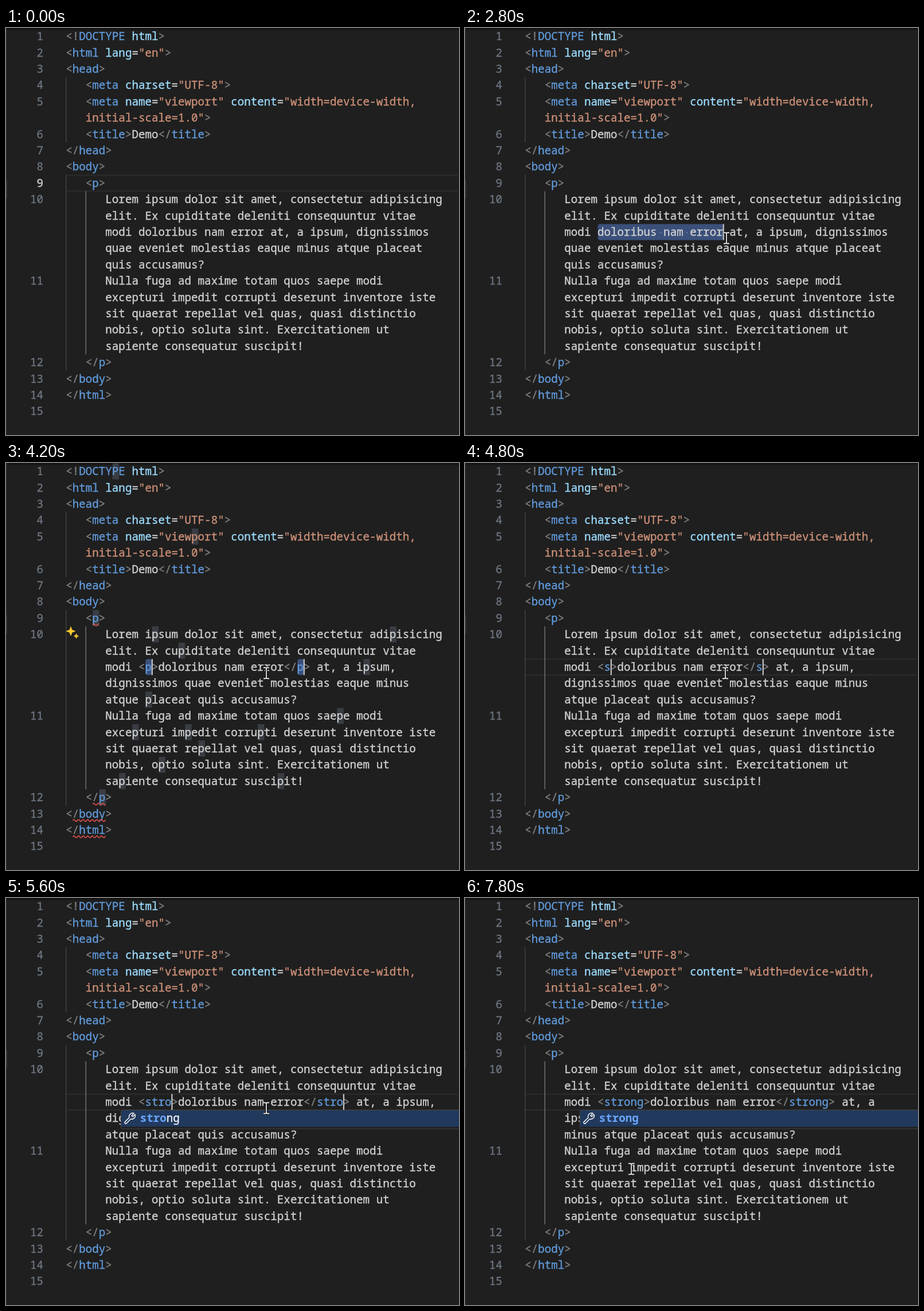
Animation, 790 px wide and 709 px high, one loop 8 s. Source, as an HTML page with a canvas:

```html
<!DOCTYPE html>
<html lang="en">
<head>
<meta charset="UTF-8">
<title>Wrap selection with tag</title>
<style>
html, body { margin: 0; width: 100%; height: 100%; overflow: hidden; background: #1f1f1f; }
canvas { display: block; }
</style>
</head>
<body>
<canvas id="stage" width="790" height="709"></canvas>
<script>
const ctx = document.getElementById('stage').getContext('2d');
const LOOP = 8000, STEP = 200;
const CHAR = 11.52, ROW = 28.4, LEFT = 105, WRAP = 51;
const FONT = '19.2px "Noto Sans Mono", "DejaVu Sans Mono", monospace';
const C = {
  bg: '#1f1f1f', text: '#d2d2d2', punct: '#808080', tag: '#619bdc', string: '#ce9178',
  attr: '#9cdcfe', number: '#6e7681', guide: '#404040', activeGuide: '#707070',
  lineBorder: '#2a2a2a', selection: '#3b507a', word: '#393d43', error: '#e5504c',
  caret: '#c4c4c4', match: '#6aa5fa', panel: '#202020', panelBorder: '#454545', active: '#21395d'
};

const HEAD = [
  [1, 0, '<!DOCTYPE html>'],
  [2, 0, '<html lang="en">'],
  [3, 0, '<head>'],
  [4, 3, '<meta charset="UTF-8">'],
  [5, 3, '<meta name="viewport" content="width=device-width,'],
  ['', 3, 'initial-scale=1.0">'],
  [6, 3, '<title>Demo</title>'],
  [7, 0, '</head>'],
  [8, 0, '<body>'],
  [9, 3, '<p>']
];
const TAIL = [[12, 3, '</p>'], [13, 0, '</body>'], [14, 0, '</html>'], [15, 0, '']];
const WRAPPED = 'doloribus nam error';
const first = inner => 'Lorem ipsum dolor sit amet, consectetur adipisicing elit. Ex cupiditate ' +
  `deleniti consequuntur vitae modi ${inner} at, a ipsum, dignissimos quae eveniet molestias ` +
  'eaque minus atque placeat quis accusamus?';
const SECOND = 'Nulla fuga ad maxime totam quos saepe modi excepturi impedit corrupti deserunt ' +
  'inventore iste sit quaerat repellat vel quas, quasi distinctio nobis, optio soluta sint. ' +
  'Exercitationem ut sapiente consequatur suscipit!';

// [time, tag name]
const EDITS = [[0, ''], [4000, 'p'], [4800, 's'], [5000, 'st'], [5400, 'str'],
  [5600, 'stro'], [5800, 'stron'], [6000, 'strong']];
// [time, x, y]
const MOUSE = [[400, 540, 620], [800, 330, 430], [1000, 245, 362], [1200, 231, 354],
  [1600, 231, 354], [2400, 456, 366], [3600, 456, 366], [4000, 454, 366], [6400, 454, 366],
  [6600, 451, 387], [7400, 292, 473], [7600, 290, 472], [8000, 290, 472]];
const DRAG_START = 1600, DRAG_END = 2400;

const colX = col => LEFT + col * CHAR;
const midY = row => 14.6 + row * ROW;

function wrap(number, text) {
  const lines = [''];
  for (const word of text.split(' ')) {
    const last = lines.length - 1;
    const joined = lines[last] ? lines[last] + ' ' + word : word;
    if (joined.length > WRAP) lines.push(word); else lines[last] = joined;
  }
  return lines.map((line, i) => [i ? '' : number, 6, line]);
}

function rect(color, x, y, w, h, radius = 0) {
  ctx.fillStyle = color;
  ctx.beginPath();
  ctx.roundRect(x, y, w, h, radius);
  ctx.fill();
}

// A hairline stroke gives the glyphs a slightly heavier weight.
function chars(text, x, row, colorAt, boldAt = () => false) {
  ctx.lineWidth = 0.35;
  [...text].forEach((ch, i) => {
    ctx.font = (boldAt(i) ? 'bold ' : '') + FONT;
    ctx.fillStyle = ctx.strokeStyle = colorAt(i);
    const at = [x - 0.8 + i * CHAR, midY(row) + 6.5];
    ctx.fillText(ch, ...at);
    if (!boldAt(i)) ctx.strokeText(ch, ...at);
  });
}

const SYNTAX = /(<[!\/]?|>)|((?<=<[!\/]?)\w+)|("[^"]*"?|initial-[^"]*")|((?<=DOCTYPE )html|\w+(?=="))/g;
function code(text, x, row) {
  const colors = Array(text.length).fill(C.text);
  const kinds = [C.punct, C.tag, C.string, C.attr];
  for (const m of text.matchAll(SYNTAX)) {
    colors.fill(kinds[m.slice(1).findIndex(Boolean)], m.index, m.index + m[0].length);
  }
  chars(text, x, row, i => colors[i]);
}

function currentLine(row) {
  rect(C.lineBorder, LEFT, midY(row) - 15, 683, 2.5);
  rect(C.lineBorder, LEFT, midY(row) + 12.5, 683, 2.5);
}

function guide(color, col, from, to) {
  rect(color, colX(col) - 1, midY(from) - ROW / 2, 1.5, (to - from + 1) * ROW);
}

function caret(col, row) {
  rect(C.caret, colX(col) - 1, midY(row) - 14, 2.2, 28);
}

function squiggle(col, length, row) {
  ctx.beginPath();
  for (let x = 0; x <= length * CHAR; x++) {
    ctx.lineTo(colX(col) + x, midY(row) + 11.8 - 1.7 * Math.sin(x * Math.PI / 4));
  }
  ctx.strokeStyle = C.error;
  ctx.lineWidth = 1.5;
  ctx.stroke();
}

function star(x, y, r) {
  ctx.beginPath();
  for (let i = 0; i < 8; i++) {
    const a = i * Math.PI / 4, d = i % 2 ? r * 0.38 : r;
    ctx.lineTo(x + d * Math.sin(a), y - d * Math.cos(a));
  }
  ctx.closePath();
  ctx.fillStyle = ctx.strokeStyle = '#fdcb2e';
  ctx.lineWidth = 1;
  ctx.lineJoin = 'round';
  ctx.fill();
  ctx.stroke();
}

const WRENCH = new Path2D('M12.8 1.9A4.2 4.2 0 0 0 7.2 7L1.9 12.3a1.3 1.3 0 0 0 1.8 1.8L9 8.8A4.2 4.2 0 0 0 14.1 3.2L11.3 6 10 4.7Z');
function suggestions(typed) {
  const words = typed === 'st' ? ['strong', 'style', 'section', 'slot', 'script', 'select'] : ['strong'];
  const top = 370, height = words.length * ROW + 3;
  rect(C.panelBorder, 200, top - 1, 600, height + 2, 4);
  rect(C.panel, 201, top, 600, height, 3);
  rect(C.active, 201, top, 600, ROW, 2);
  words.forEach((word, n) => {
    const hits = new Set();
    let at = -1;
    for (const ch of typed) hits.add(at = word.indexOf(ch, at + 1));
    const hit = i => hits.has(i);
    chars(word, 234.5, 13 + n, i => hit(i) ? C.match : n ? C.text : '#f4f4f4', hit);
    ctx.save();
    ctx.translate(204.5, midY(13 + n) - 11.5);
    ctx.scale(1.45, 1.45);
    ctx.strokeStyle = n ? '#cccccc' : '#f4f4f4';
    ctx.lineWidth = 1.05;
    ctx.lineJoin = 'round';
    ctx.stroke(WRENCH);
    ctx.restore();
  });
}

const BEAM = new Path2D('M-5-9.5h3q2 0 2 2v15q0 2-2 2h-3M5-9.5h-3q-2 0-2 2M0 7.5q0 2 2 2h3');
function pointer(t) {
  if (t < MOUSE[0][0]) return;
  const i = MOUSE.findIndex(([time]) => time > t);
  const [t0, x0, y0] = MOUSE[i - 1], [t1, x1, y1] = MOUSE[i];
  const k = (t - t0) / (t1 - t0);
  ctx.save();
  ctx.translate(x0 + (x1 - x0) * k, y0 + (y1 - y0) * k);
  for (const [color, width] of [['#0c0c0c', 4], ['#e8e8e8', 1.8]]) {
    ctx.strokeStyle = color;
    ctx.lineWidth = width;
    ctx.stroke(BEAM);
  }
  ctx.restore();
}

function draw(t) {
  const [editTime, tag] = EDITS.findLast(([time]) => time <= t);
  const inner = tag ? `<${tag}>${WRAPPED}</${tag}>` : WRAPPED;
  const rows = [...HEAD, ...wrap(10, first(inner)), ...wrap(11, SECOND), ...TAIL];
  const drag = Math.min(1, (t - DRAG_START) / (DRAG_END - DRAG_START));
  const selected = tag || drag <= 0 ? 0 : Math.round(WRAPPED.length * drag);
  const renaming = tag === 'p', typing = tag.length > 0 && !renaming;
  const openEnd = 12 + tag.length, closeEnd = openEnd + WRAPPED.length + 3 + tag.length;

  rect(C.bg, 0, 0, 790, 709);
  rect('#121212', 0, 0, 790, 2);
  rect('#191919', 0, 2, 790, 2);
  rect('#2b2b2b', 0, 0, 1.5, 709);
  rect('#414141', 0, 265, 1.5, 32);

  if (t < DRAG_START + STEP) currentLine(9);
  if (typing) currentLine(12);

  guide(C.guide, 0, 3, 6);
  guide(C.guide, 0, 9, 20);
  guide(C.activeGuide, 3, 10, 19);

  if (selected) rect(C.selection, colX(11), midY(12) - 14, selected * CHAR, 28, 4);

  rows.forEach(([number, indent, text], row) => {
    if (renaming) {
      for (const m of text.matchAll(/p/gi)) {
        const col = indent + m.index;
        const own = row === 12 && (col + 1 === openEnd || col + 1 === closeEnd);
        rect(own ? C.selection : C.word, colX(col), midY(row) - 14, CHAR, 28, own ? 4 : 0);
      }
    }
    const label = String(number);
    const color = number === 9 && t < DRAG_START + STEP ? C.text : C.number;
    chars(label, 65.8 - label.length * CHAR, row, () => color);
    code(text, colX(indent), row);
  });

  if (selected) {
    [...WRAPPED.slice(0, selected)].forEach((ch, i) => {
      if (ch === ' ') rect('#7487aa', colX(11 + i) + 4.6, midY(12) - 0.2, 2.2, 2.2, 1);
    });
  }
  if (renaming) {
    squiggle(4, 1, 9);
    squiggle(4, 2, 20);
    squiggle(1, 5, 21);
    squiggle(1, 5, 22);
  }
  if (t >= 3000 && !typing) {
    star(113, 293, 7.5);
    star(122.5, 301.5, 4);
  }

  const lastAction = tag ? editTime : DRAG_END;
  const blinkOn = t < lastAction || (t - lastAction) % 1000 < 500;
  if (blinkOn && tag) {
    caret(openEnd, 12);
    caret(closeEnd, 12);
  } else if (blinkOn && selected) {
    caret(11 + selected, 12);
  }

  if (typing && t >= 5000) suggestions(tag);
  pointer(t);
}

function tick() {
  const t = performance.now() % LOOP;
  draw(Math.floor(t / STEP) * STEP);
  requestAnimationFrame(tick);
}
tick();
</script>
</body>
</html>
```
